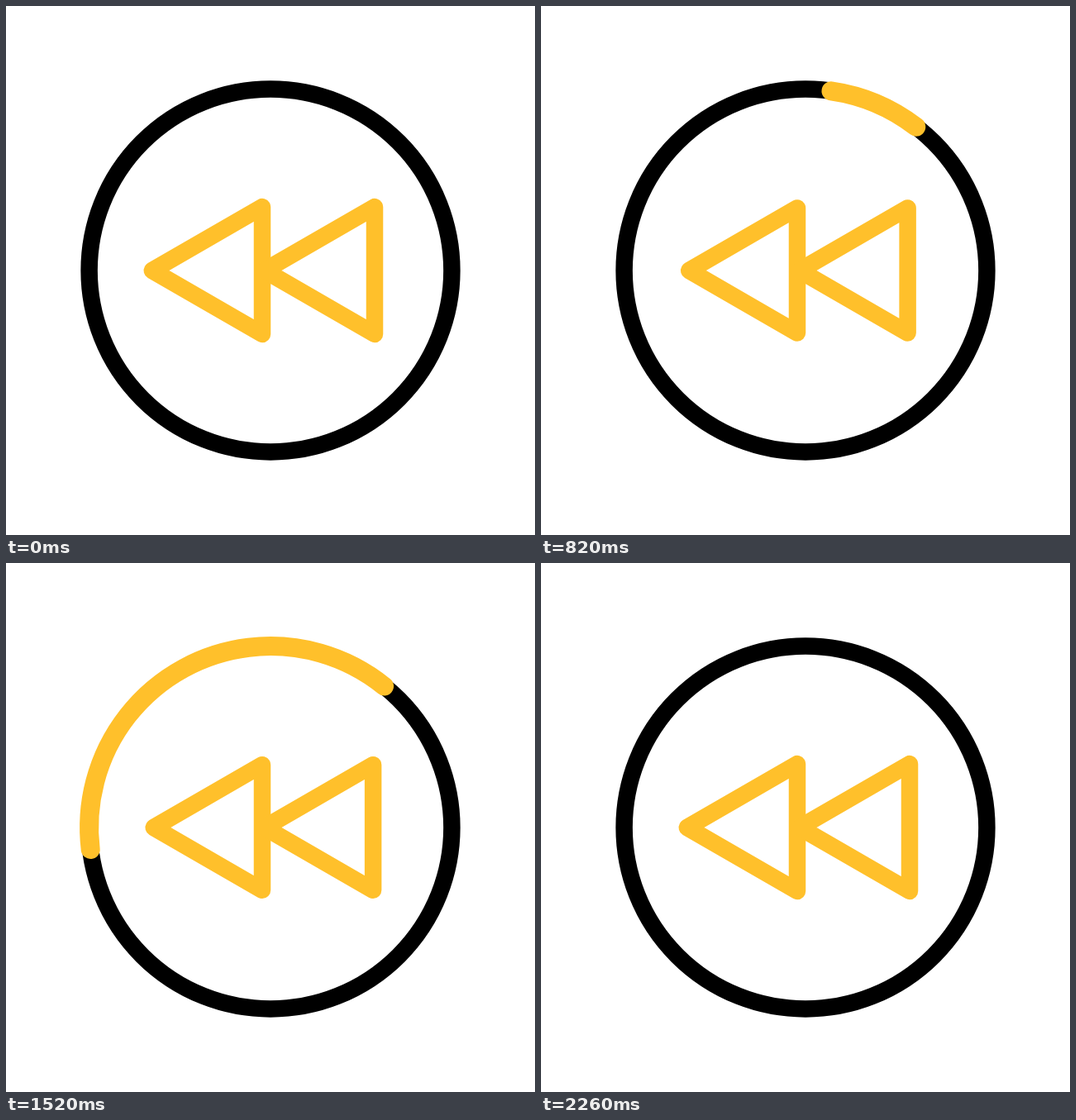
Recreate the animation shown at these times as an HTML page with a canvas. Size 640 by 640 pixels, loop 2.72 s.

```html
<!DOCTYPE html>
<html lang="en">
<head>
<meta charset="utf-8">
<title>Rewind</title>
<style>
  html, body { margin: 0; width: 100%; height: 100%; overflow: hidden; background: #fff; }
  canvas { display: block; }
</style>
</head>
<body>
<canvas width="640" height="640"></canvas>
<script>
const LOOP = 2720;
const GOLD = '#ffc02b';
const ctx = document.querySelector('canvas').getContext('2d');
ctx.lineJoin = ctx.lineCap = 'round';

// Keys are [time in ms, value]
const widthKeys = [[0, 133.2], [130, 146], [560, 106.6], [1010, 145.4], [1380, 130.5], [1760, 133.2]];
// Degrees travelled counter-clockwise from the top
const headKeys = [[565, -180], [1020, 125.4], [1320, 326.2], [1760, 608.3], [2250, 900]];
const tailKeys = [[565, -180], [1020, 68.3], [1320, 199.4], [1760, 488.1], [2250, 900]];

const easeInOut = p => (1 - Math.cos(Math.PI * p)) / 2;

function segmentAt(keys, t) {
  const next = keys.findIndex(key => key[0] > t);
  return next < 0 ? keys.length - 2 : Math.max(0, next - 1);
}

function swing(keys, t) {
  const i = segmentAt(keys, t);
  const [t0, a] = keys[i], [t1, b] = keys[i + 1];
  return a + (b - a) * easeInOut(Math.min(1, (t - t0) / (t1 - t0)));
}

// Smooth curve through all keys
function glide(keys, t) {
  const slope = i => {
    const a = keys[Math.max(0, i - 1)], b = keys[Math.min(keys.length - 1, i + 1)];
    return (b[1] - a[1]) / (b[0] - a[0]);
  };
  const i = segmentAt(keys, t);
  const [t0, a] = keys[i], [t1, b] = keys[i + 1];
  const span = t1 - t0, p = (t - t0) / span, q = 1 - p;
  return q * q * (1 + 2 * p) * a + p * p * (1 + 2 * q) * b
    + span * p * q * (q * slope(i) - p * slope(i + 1));
}

function ring(color, width, from, to) {
  const angle = deg => (-90 - deg) * Math.PI / 180;
  ctx.strokeStyle = color;
  ctx.lineWidth = width;
  ctx.beginPath();
  ctx.arc(320, 320, 219.4, angle(from), angle(to));
  ctx.stroke();
}

function triangle(tip, width) {
  const half = width / Math.sqrt(3);
  ctx.strokeStyle = GOLD;
  ctx.lineWidth = 20.5;
  ctx.beginPath();
  ctx.moveTo(tip, 320);
  ctx.lineTo(tip + width, 320 - half);
  ctx.lineTo(tip + width, 320 + half);
  ctx.closePath();
  ctx.stroke();
}

function draw(now) {
  const t = now % LOOP;
  ctx.fillStyle = '#fff';
  ctx.fillRect(0, 0, 640, 640);
  ring('#000', 20.5, 360, 0);
  if (t > headKeys[0][0] && t < headKeys.at(-1)[0]) {
    ring(GOLD, 23, glide(headKeys, t), glide(tailKeys, t));
  }
  const width = swing(widthKeys, t);
  triangle(310 - width, width);
  triangle(312.8, width);
  requestAnimationFrame(draw);
}
draw(0);
</script>
</body>
</html>
```
